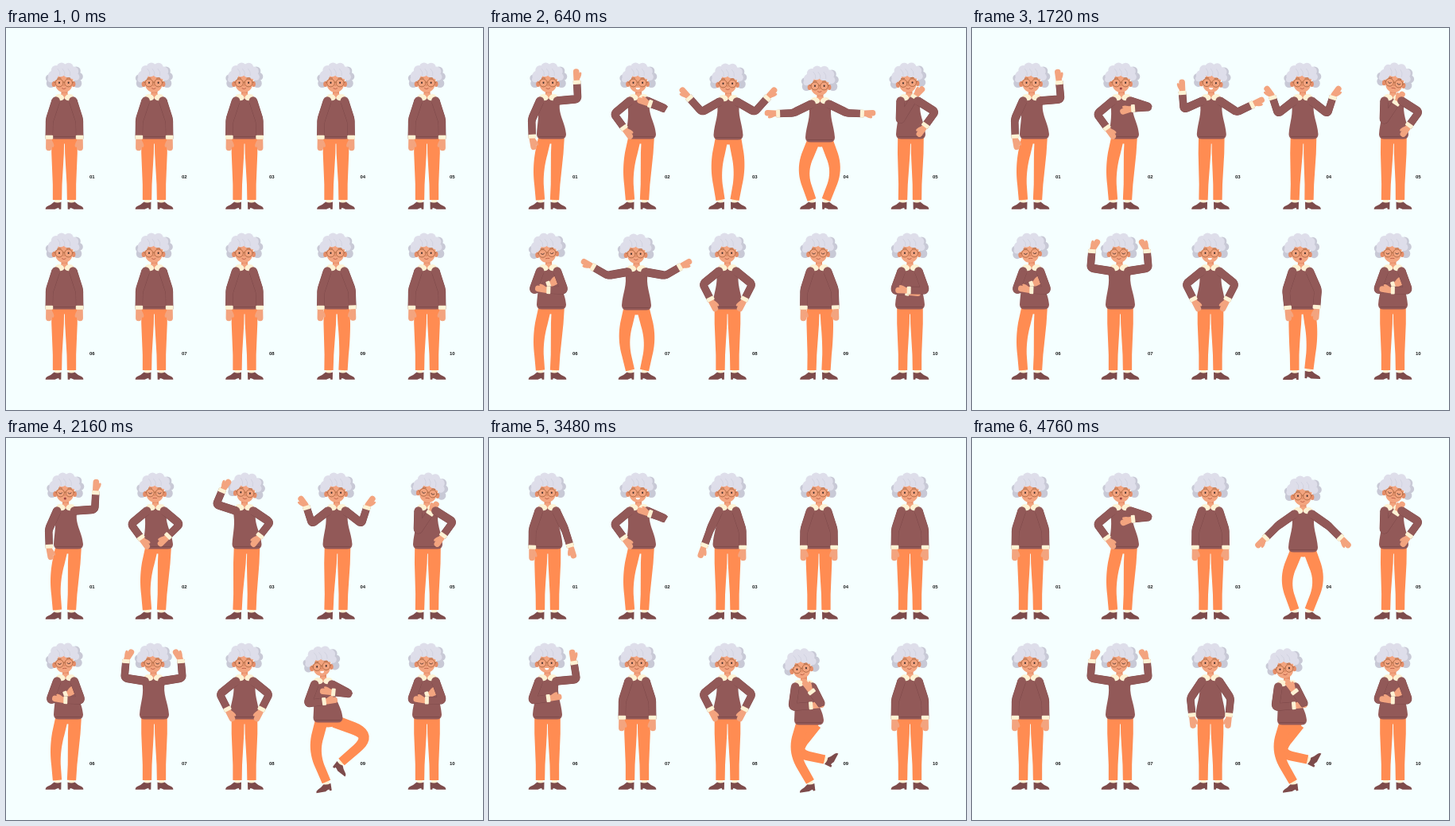
An HTML page with a canvas that plays this animation: 600x480 px, repeating every 4.8 s.

```html
<!DOCTYPE html>
<html lang="en">
<head>
<meta charset="utf-8">
<title>Character poses</title>
<style>
html, body { margin: 0; width: 100%; height: 100%; overflow: hidden; background: #f5ffff; }
canvas { display: block; }
span { position: absolute; font: bold 6px/6px "Liberation Sans", Arial, sans-serif; color: #1c1c1c; }
</style>
</head>
<body>
<canvas id="stage" width="600" height="480"></canvas>
<script>
const ctx = document.getElementById('stage').getContext('2d');
const LOOP = 4800, STEP = 40, ROW = 214;
const COLS = [73.5, 186.5, 300, 415, 529.5];
const LABELS = [105, 221, 331, 445.5, 558];
const C = {
  bg: '#f5ffff', knit: '#925958', fold: '#784546', pants: '#ff8c52', shoe: '#7d4b4b',
  skin: '#f3a47f', shade: '#e58d68', hair: '#dedeea', hairBack: '#c8c9d6', strand: '#cfd0de',
  cream: '#fdf2d4', frame: '#a8623c', dark: '#43302f'
};

// Arms: [upper angle, forearm angle, forearm scale, hand bend]; 0 hangs down, positive is outward.
// Knees are offsets from the straight leg, feet are [outward x, y, turn].
const full = o => {
  const arm = (a = []) => [a[0] ?? 18, a[1] ?? 1, a[2] ?? 1, a[3] ?? 0];
  return {
    s: 0, h: 0, y: 0, t: 0, eyes: 'open', mouth: 'smile',
    kl: [0, 0], kr: [0, 0], fl: [9, 216, 0], fr: [9, 216, 0],
    ...o, L: arm(o.L), R: arm(o.R)
  };
};
const both = (...a) => ({ L: a, R: a });
const crouch = (y, k) => ({ y, kl: [k, 0], kr: [k, 0] });
const lean = { s: 1.5, h: 5, kl: [6, 0] };

const rest = {};
const wave = { ...lean, L: [24, -2, 1, -8], R: [95, 183] };
const waveIn = { ...wave, R: [95, 198, 1, 8] };
const waveOut = { ...wave, R: [94, 177] };

const chin = { ...lean, L: [50, -36], R: [66, -109], mouth: 'open' };
const chest = { ...chin, R: [72, -92, 1, 8], mouth: 'o' };
const hips2 = { ...chin, R: [50, -45], eyes: 'closed', mouth: 'flat' };

const shrugLow = { s: 1, h: 1, ...crouch(1, 7), ...both(60, 138, 1.1) };
const shrugTalk = { s: 1, h: 1, L: [58, 170], R: [57, 145], mouth: 'open', t: 3 };
const salute = { h: 3, t: 7, L: [108, 203, 0.9, 14], R: [56, -38] };
const lower = { L: [25, 20] };

const drop = { s: 1.5, h: 1.5, ...crouch(4, 14), ...both(55, 45) };
const spread = { ...drop, ...both(64, 88, 0.9, 5) };
const shrug = { s: 1, h: 2, ...both(52, 162, 1, -18) };
const offer = { s: 1, h: 2, ...both(58, 112) };

const facepalm = { t: -4, s: -1, h: 1, L: [2, -149, 1.65, 14], R: [58, -36], eyes: 'closed' };
const lookUp = { ...facepalm, t: 9, s: 0, L: [2, -146, 1.3, 0], mouth: 'flat' };
const heart = { h: 1, L: [30, -106], R: [55, -33] };

const fold = { ...lean, t: -4, L: [20, -110, 1, -8], R: [20, -92, 0.95, -8], eyes: 'closed', mouth: 'flat' };
const tap = { ...fold, kl: [9, 0], fl: [14, 215, -16] };
const explain = { ...fold, L: [20, -70, 0.9], R: [26, -82, 1], eyes: 'open', mouth: 'o' };
const swear = { L: [20, -98], R: [95, 189], mouth: 'open' };

const cheer = { s: -1, h: -1, ...crouch(1, 9), ...both(80, 120) };
const overhead = { s: -1, ...both(99, 185, 1, 28), eyes: 'closed' };
const handsUp = { s: -1, ...both(90, 173), eyes: 'closed' };

const akimbo = { ...both(51, -27) };
const akimboTalk = { ...akimbo, mouth: 'open' };
const akimboEnd = { ...both(34, -6) };

const still = { h: 1, R: [21, 2], kr: [2, 0] };
const hop = {
  s: -16, h: -10, y: 4, t: -5, L: [20, -98], R: [62, -96], mouth: 'open',
  kl: [13, 0], fl: [12, 218, 10], kr: [43, -8], fr: [7, 193, 38]
};
const coy = {
  s: -19, h: -12.5, y: 7, t: -8, L: [8, -95, 1.1], R: [27, -143, 1],
  kl: [16, 0], fl: [11, 218, 8], kr: [-34, 14], fr: [7, 190, -62]
};

const halfFold = { L: [20, -84, 0.8], R: [20, -91] };
const cross = { L: [20, -108, 1, -8], R: [20, -91, 0.95, -8], eyes: 'closed', mouth: 'flat' };
const clasp = { ...both(27, -46), t: 2 };

// Each actor: own cycle length, then [time, pose] steps.
const actor = (cycle, ...keys) => ({ cycle, keys: keys.map(([at, p]) => [at, full(p)]) });
const actors = [
  actor(LOOP, [0, rest], [120, rest], [560, wave], [720, wave], [960, waveOut], [1280, waveIn],
    [1600, waveOut], [1880, waveIn], [2120, { ...waveOut, eyes: 'closed', mouth: 'o' }],
    [2320, { ...waveOut, eyes: 'closed', mouth: 'o' }], [2560, waveIn], [2840, waveOut], [3000, waveOut],
    [3600, rest]),
  actor(2800, [0, rest], [80, rest], [560, chin], [960, chin], [1240, chest], [1960, { ...chest, R: [72, -84, 1, 16] }],
    [2140, hips2], [2320, hips2], [2760, rest]),
  actor(LOOP, [0, rest], [120, rest], [600, shrugLow], [760, shrugLow], [1120, shrugTalk], [1600, shrugTalk],
    [2060, salute], [3000, salute], [3480, lower], [3640, rest]),
  actor(4320, [0, rest], [60, rest], [440, drop], [640, spread], [1080, shrug], [2400, shrug],
    [2800, offer], [2960, offer], [3440, rest]),
  actor(3320, [0, rest], [180, rest], [600, { ...facepalm, eyes: 'open' }], [1000, facepalm], [1280, facepalm],
    [1430, lookUp], [2240, lookUp], [2640, heart], [2880, heart], [3280, rest]),
  actor(LOOP, [0, rest], [100, rest], [560, fold], [860, fold], [960, tap], [1060, fold], [1160, fold], [1260, tap],
    [1340, tap], [1460, fold], [2320, fold], [2760, explain], [2920, explain], [3400, swear], [3800, swear], [4320, rest]),
  actor(3480, [0, rest], [100, rest], [600, cheer], [720, cheer], [1160, overhead], [2300, overhead],
    [2760, handsUp], [2900, handsUp], [3440, rest]),
  actor(LOOP, [0, rest], [100, rest], [540, akimbo], [1000, akimbo], [1100, akimboTalk], [1600, akimboTalk],
    [1900, { ...akimbo, mouth: 'flat' }], [2400, { ...akimbo, mouth: 'flat' }], [2740, akimboTalk],
    [3200, akimbo], [4480, akimbo], [4760, akimboEnd]),
  actor(LOOP, [0, still], [400, { ...still, eyes: 'closed' }], [840, { ...still, eyes: 'closed' }],
    [1040, { ...still, mouth: 'o' }], [1640, { ...still, mouth: 'o' }], [2120, hop], [2280, hop], [2740, coy]),
  actor(3480, [0, rest], [200, rest], [640, halfFold], [900, cross], [2320, cross], [2760, clasp],
    [2960, clasp], [3440, rest])
];

const lerp = (a, b, u) => a + (b - a) * u;
const rad = d => d * Math.PI / 180;
const ease = u => (1 - Math.cos(Math.PI * u)) / 2;

function mix(a, b, u) {
  if (typeof a === 'number') return lerp(a, b, u);
  if (Array.isArray(a)) return a.map((v, i) => mix(v, b[i], u));
  return u < 0.5 ? a : b;
}

function poseAt({ cycle, keys }, time) {
  const t = time % cycle;
  const i = keys.findIndex(k => k[0] > t);
  if (i < 0) return keys[keys.length - 1][1];
  const [t0, a] = keys[i - 1], [t1, b] = keys[i];
  const u = ease((t - t0) / (t1 - t0));
  return Object.fromEntries(Object.keys(a).map(k => [k, mix(a[k], b[k], u)]));
}

function group(draw) {
  ctx.save();
  draw();
  ctx.restore();
}

function shape(color, build) {
  ctx.beginPath();
  build();
  ctx.fillStyle = color;
  ctx.fill();
}

function line(color, width, build) {
  ctx.beginPath();
  build();
  ctx.strokeStyle = color;
  ctx.lineWidth = width;
  ctx.stroke();
}

const oval = (color, x, y, rx, ry = rx, turn = 0) =>
  shape(color, () => ctx.ellipse(x, y, rx, ry, rad(turn), 0, 7));

// Tapered two-part limb; bend is how far the straight parts reach to the joint.
function limb(a, k, b, w0, w1, bend, color) {
  const p = mix(a, k, bend), q = mix(b, k, bend), pts = [a];
  for (let i = 0; i <= 10; i++) {
    const u = i / 10;
    pts.push(mix(mix(p, k, u), mix(k, q, u), u));
  }
  pts.push(b);
  const last = pts.length - 1;
  const edge = side => pts.map(([x, y], i) => {
    const [x0, y0] = pts[Math.max(i - 1, 0)], [x1, y1] = pts[Math.min(i + 1, last)];
    const d = Math.hypot(x1 - x0, y1 - y0) || 1;
    const w = side * lerp(w0, w1, i / last) / 2;
    return [x - (y1 - y0) / d * w, y + (x1 - x0) / d * w];
  });
  shape(color, () => {
    [...edge(1), ...edge(-1).reverse()].forEach(pt => ctx.lineTo(...pt));
    ctx.closePath();
  });
}

function arm(side, p, [up, fore, reach, bend]) {
  const along = ([x, y], deg, len) => [x + Math.sin(rad(deg)) * len, y + Math.cos(rad(deg)) * len];
  const sh = [side * p.s + 10.8, 91.5 + p.y];
  const elbow = along(sh, up, 26), wrist = along(elbow, fore, 23 * reach);
  group(() => {
    ctx.scale(side, 1);
    limb(sh, elbow, wrist, 10.6, 9.4, 0.84, C.fold);
    oval(C.knit, ...sh, 5.2);
    limb(sh, elbow, wrist, 10, 8.8, 0.84, C.knit);
    ctx.translate(...wrist);
    ctx.rotate(-rad(fore));
    group(() => {
      ctx.rotate(-rad(bend));
      shape(C.skin, () => ctx.roundRect(-3.6, -2, 7.6, 17, 3.7));
      oval(C.skin, -3.6, 6, 1.9, 4.8, 22);
    });
    shape(C.cream, () => ctx.roundRect(-4.9, -4.5, 9.8, 5, 1));
  });
}

function leg(side, p, knee, [fx, fy, turn]) {
  const hip = [side * p.h + 8.3, 138 + p.y], end = [fx, fy];
  const mid = mix(hip, end, 0.5);
  group(() => {
    ctx.scale(side, 1);
    group(() => {
      ctx.translate(fx, fy);
      ctx.rotate(rad(turn));
      shape(C.cream, () => ctx.rect(-3.5, -2, 7, 6));
      shape(C.shoe, () => {
        ctx.moveTo(-5, 2.6);
        ctx.quadraticCurveTo(0, 4.4, 4, 2.6);
        ctx.quadraticCurveTo(7.5, 6, 12, 7.8);
        ctx.quadraticCurveTo(15, 9.2, 14.8, 11.8);
        ctx.lineTo(3, 11.8);
        ctx.quadraticCurveTo(0, 10, -1.8, 10);
        ctx.lineTo(-2.2, 11.8);
        ctx.lineTo(-4.8, 11.8);
        ctx.closePath();
      });
    });
    limb(hip, [mid[0] + knee[0], mid[1] + knee[1]], end, 16, 11.3, 0.5, C.pants);
  });
}

function torso({ s, h, y }) {
  const low = 139.5 + y;
  shape(C.pants, () => {
    ctx.moveTo(h - 16.3, low - 8);
    ctx.lineTo(h + 16.3, low - 8);
    ctx.lineTo(h + 9, low + 5);
    ctx.lineTo(h, low + 6);
    ctx.lineTo(h - 9, low + 5);
  });
  shape(C.knit, () => {
    ctx.moveTo(s - 6, 85 + y);
    ctx.quadraticCurveTo(s - 14, 86 + y, s - 14.5, 92 + y);
    ctx.bezierCurveTo(s - 11, 108 + y, h - 17.5, 118 + y, h - 18.5, low - 6);
    ctx.quadraticCurveTo(h - 18.5, low, h - 12, low);
    ctx.lineTo(h + 12, low);
    ctx.quadraticCurveTo(h + 18.5, low, h + 18.5, low - 6);
    ctx.bezierCurveTo(h + 17.5, 118 + y, s + 11, 108 + y, s + 14.5, 92 + y);
    ctx.quadraticCurveTo(s + 14, 86 + y, s + 6, 85 + y);
  });
  line(C.fold, 0.7, () => {
    ctx.moveTo(h - 16, low - 3);
    ctx.lineTo(h + 16, low - 3);
  });
}

function collar({ s, y }) {
  group(() => {
    ctx.translate(s, y);
    shape(C.shade, () => ctx.rect(-4, 76, 8, 10));
    shape(C.skin, () => ctx.ellipse(0, 85, 5, 3.5, 0, 0, 7));
    oval(C.cream, -6, 87.1, 5.8, 3.9, 14);
    oval(C.cream, 6, 87.1, 5.8, 3.9, -14);
  });
}

function mouth(kind) {
  if (kind === 'open') {
    shape('#ffffff', () => ctx.arc(0, 75, 2.5, 0, Math.PI));
  } else if (kind === 'o') {
    oval('#a04440', 0, 76, 1.6, 1.5);
  } else {
    line('#b4553f', 0.8, () => {
      ctx.moveTo(-2.6, 75.6);
      ctx.quadraticCurveTo(0, kind === 'flat' ? 75 : 77.6, 2.6, 75.6);
    });
  }
}

function head({ s, y, t, eyes, mouth: kind }) {
  group(() => {
    ctx.translate(s - 0.7, y + 84);
    ctx.rotate(rad(t));
    ctx.translate(0, -84);
    for (const [x, cy, r] of [[15.5, 54, 5.5], [19, 61, 5], [17, 69.5, 5.5], [-16.5, 69.5, 5.5], [-18.5, 63, 4.5]])
      oval(C.hairBack, x, cy, r);
    oval(C.shade, -12.5, 70.5, 2.6, 3.6);
    oval(C.shade, 12.2, 70.5, 2.4, 3.4);
    shape(C.skin, () => {
      ctx.moveTo(-11.8, 57);
      ctx.lineTo(11.8, 57);
      ctx.bezierCurveTo(12.5, 74, 9, 80.5, 0, 80.8);
      ctx.bezierCurveTo(-9, 80.5, -12.5, 74, -11.8, 57);
    });
    for (const [x, cy, r] of [[-13.5, 60, 6.4], [-10, 53, 6], [-3, 49.5, 6], [6, 49.8, 6], [12.5, 54.5, 6],
      [15, 61.5, 4.6], [5, 56, 6.2], [-4, 55, 6.2], [-16.5, 64.5, 3.8], [11, 59.5, 4.6]])
      oval(C.hair, x, cy, r);
    line(C.strand, 0.8, () => {
      for (const x of [-8, -2, 5]) {
        ctx.moveTo(x, 51);
        ctx.quadraticCurveTo(x + 4, 55, x + 3, 60);
      }
    });
    for (const x of [-5.8, 5.8]) {
      if (eyes === 'open') oval(C.dark, x, 68.8, 1, 1.3);
      else line(C.dark, 0.8, () => ctx.arc(x, 67.8, 2.2, 0.3, 2.84));
      line(C.frame, 0.8, () => ctx.arc(x, 69, 4.9, 0, 7));
      line(C.frame, 0.8, () => {
        ctx.moveTo(x - 2.5, 63.2);
        ctx.quadraticCurveTo(x, 62.2, x + 2.5, 63.2);
      });
    }
    line(C.frame, 0.8, () => {
      ctx.moveTo(-1.2, 68.5);
      ctx.quadraticCurveTo(0, 67.4, 1.2, 68.5);
      ctx.moveTo(-10.6, 68.6);
      ctx.lineTo(-12.5, 68);
      ctx.moveTo(10.6, 68.6);
      ctx.lineTo(12.5, 68);
    });
    oval(C.shade, 0, 72, 1.5, 1);
    mouth(kind);
  });
}

function person(p) {
  leg(1, p, p.kr, p.fr);
  leg(-1, p, p.kl, p.fl);
  torso(p);
  collar(p);
  head(p);
  arm(-1, p, p.L);
  arm(1, p, p.R);
}

function render(now) {
  const time = Math.floor(now % LOOP / STEP) * STEP;
  ctx.fillStyle = C.bg;
  ctx.fillRect(0, 0, 600, 480);
  actors.forEach((a, i) => group(() => {
    ctx.translate(COLS[i % 5], i < 5 ? 0 : ROW);
    person(poseAt(a, time));
  }));
}

actors.forEach((_, i) => {
  const label = document.createElement('span');
  label.textContent = String(i + 1).padStart(2, '0');
  label.style.left = LABELS[i % 5] + 'px';
  label.style.top = (i < 5 ? 184 : 406) + 'px';
  document.body.append(label);
});

const start = performance.now();
function tick() {
  render(performance.now() - start);
  requestAnimationFrame(tick);
}
tick();
</script>
</body>
</html>
```
